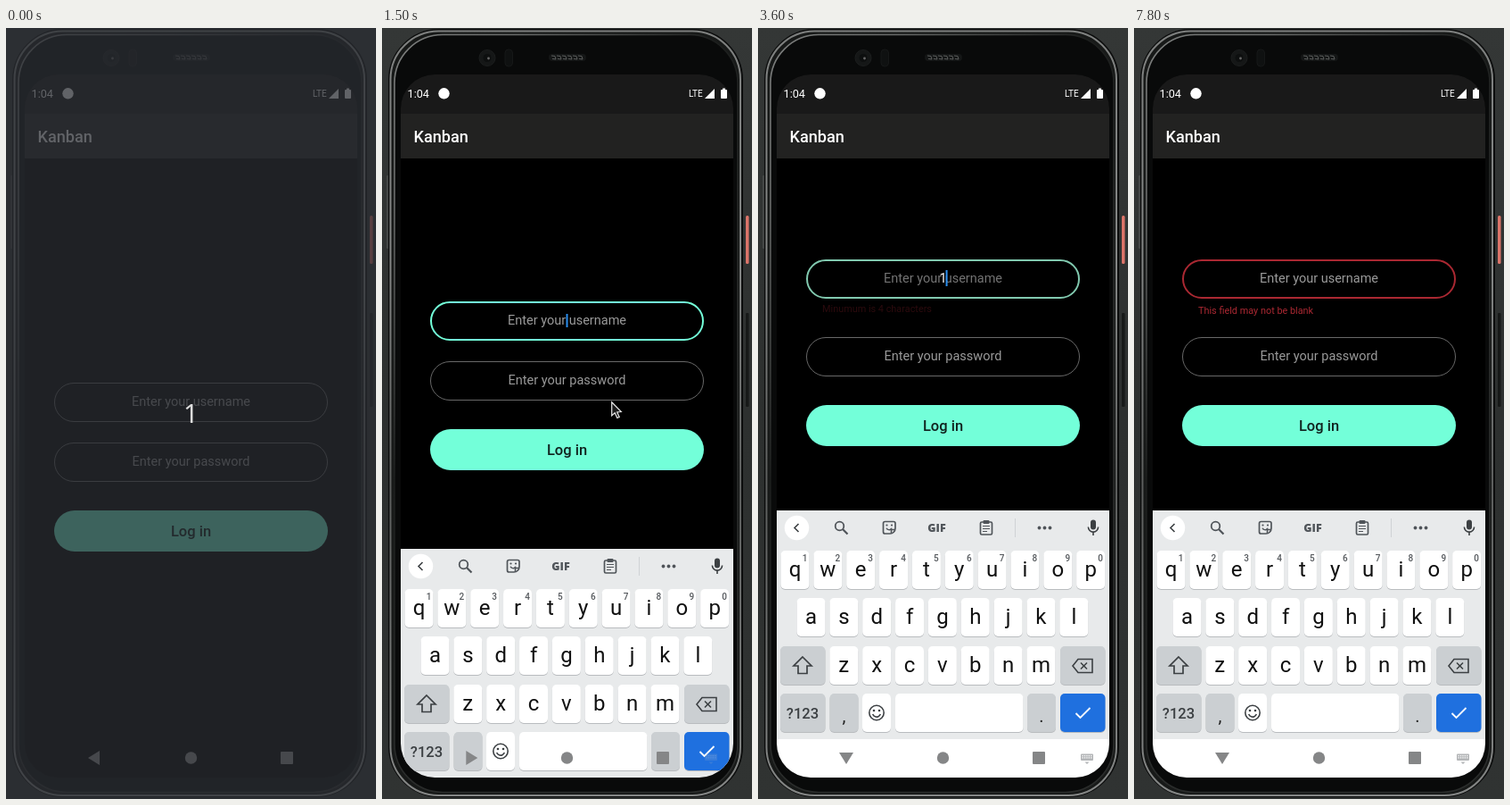
An HTML page with a canvas for the animation above (8000 ms loop, 415 by 863 pixels).

```html
<!DOCTYPE html>
<html lang="en">
<head>
<meta charset="utf-8">
<title>Kanban log in</title>
<style>
  html, body { margin: 0; width: 100%; height: 100%; overflow: hidden; background: #2d302f; }
  canvas { display: block; width: 415px; height: 863px; }
</style>
</head>
<body>
<canvas id="stage" width="415" height="863"></canvas>
<script>
const ctx = document.getElementById('stage').getContext('2d');
const LOOP = 8000;
const CENTER = 207.5;
const MINT = [115, 255, 217], RED = [170, 40, 50], GREY = [104, 104, 104];
const INK = '#3c4043', SOFT_INK = '#50555a', HINT = '#9a9a9a';

const clamp = v => Math.max(0, Math.min(1, v));
const ramp = (t, from, length) => clamp((t - from) / length);
const within = (t, spans) => spans.some(([a, b]) => t >= a && t < b);
const mix = (a, b, p) => a.map((v, i) => v + (b[i] - v) * p);
const rgb = c => `rgb(${c.map(Math.round).join(',')})`;

function paint(fill, stroke, width) {
  if (fill) { ctx.fillStyle = fill; ctx.fill(); }
  if (stroke) { ctx.strokeStyle = stroke; ctx.lineWidth = width; ctx.stroke(); }
}

function box(x, y, w, h, r, fill, stroke, width = 1) {
  ctx.beginPath();
  ctx.roundRect(x, y, w, h, r);
  paint(fill, stroke, width);
}

function disc(x, y, r, fill, stroke, width = 1) {
  box(x - r, y - r, 2 * r, 2 * r, r, fill, stroke, width);
}

function arc(x, y, r, from, to, stroke, width) {
  ctx.beginPath();
  ctx.arc(x, y, r, from, to);
  paint(null, stroke, width);
}

function poly(points, { fill, stroke, width = 1.6, open = false }) {
  ctx.beginPath();
  points.forEach(([x, y]) => ctx.lineTo(x, y));
  if (!open) ctx.closePath();
  paint(fill, stroke, width);
}

function label(str, x, y, size, color, { align = 'center', weight = 400, family = 'Roboto' } = {}) {
  ctx.font = `${weight} ${size}px "${family}", sans-serif`;
  ctx.textAlign = align;
  ctx.fillStyle = color;
  ctx.fillText(str, x, y);
  return ctx.measureText(str).width;
}

function faded(alpha, draw) {
  if (alpha <= 0) return;
  ctx.save();
  ctx.globalAlpha = alpha;
  draw();
  ctx.restore();
}

function gradient(x, y, ...stops) {
  const g = ctx.createLinearGradient(0, 0, x, y);
  stops.forEach(([at, color]) => g.addColorStop(at, color));
  return g;
}

const shell = gradient(0, 863, [0, '#343736'], [0.5, '#2d302f'], [1, '#303332']);
const rim = gradient(0, 863, [0, '#7d7f7e'], [0.3, '#858786'], [0.6, '#5c5e5d'], [1, '#858786']);
const innerRim = gradient(415, 300, [0, '#808281'], [0.25, '#6a6c6b'], [0.6, '#1c1e1d'], [1, '#2a2c2b']);

function drawPhone() {
  ctx.fillStyle = shell;
  ctx.fillRect(0, 0, 415, 863);
  box(5, 165, 3, 82, 1, '#444746');
  box(408, 319, 3.5, 105, 1, '#171918');
  box(408, 210, 3.5, 54, 1.5, '#dc7469');
  box(8, 2, 396, 858, 56, '#171918', '#0c0d0d', 2);
  box(9.5, 3.5, 392.5, 855.5, 54, null, rim, 2);
  box(14, 7.5, 385, 848, 54, '#090a0a', innerRim, 1.6);

  disc(118, 33.5, 9, '#151717', '#1c1e1e');
  disc(118, 33.5, 4.5, '#0d0f0f');
  disc(119.5, 34, 1.4, '#666');
  box(138, 24, 8.5, 19, 4, '#0f1111', '#161818');
  box(187, 29, 42, 8, 4, '#141616');
  for (let x = 190; x < 226; x += 6) {
    poly([[x, 31], [x + 4, 31.5], [x + 5, 35], [x + 1, 34.5]], { stroke: '#5a5c5b', width: 1, open: true });
  }
}

function drawBars() {
  ctx.fillStyle = '#000';
  ctx.fillRect(21, 52, 373, 787);
  ctx.fillStyle = '#191919';
  ctx.fillRect(21, 52, 373, 44);
  ctx.fillStyle = '#222221';
  ctx.fillRect(21, 96, 373, 50);
  label('1:04', 28.5, 78, 12.7, '#fff', { align: 'left' });
  disc(69.5, 73.3, 6.2, '#fff');
  label('LTE', 344, 77, 10, '#fff', { align: 'left' });
  poly([[362, 79], [373, 79], [373, 68]], { fill: '#fff' });
  box(380, 69, 7, 10, 1, '#fff');
  box(382, 67.6, 3, 2, 0, '#fff');
  label('Kanban', 35.5, 128, 18.14, '#fff', { align: 'left', weight: 500 });
}

function field(y, color, width) {
  const inset = width / 2;
  box(54 + inset, y + inset, 307 - width, 44 - width, 22 - inset, null, color, width);
}

const carets = [[1400, 1800], [2300, 2800], [3300, 4100], [4600, 5900], [6400, 7800]];

function typed(t) {
  if (t < 3600 || t >= 7300) return '';
  if (t < 5000) return '1';
  if (t < 5400) return '12';
  if (t < 6500) return '123';
  return t < 7000 ? '12' : '1';
}

function drawForm(t) {
  const lift = t < 1400 ? 0 : 128 * (1 - Math.exp((1400 - t) / 80));
  const shift = t > 1850 ? 128 : Math.round(lift);
  const spread = t >= 3600 ? 10 : 0;
  const error = ramp(t, 3550, 200);
  const focus = ramp(t, 1350, 100);
  const userY = 397 - shift - spread;
  const restY = spread - shift;
  const hintAlpha = t < 7300 ? 1 - error : ramp(t, 7250, 200);

  field(userY, rgb(mix(mix(GREY, MINT, focus), RED, error)), 1 + focus);
  faded(hintAlpha, () => label('Enter your username', CENTER, userY + 26, 14.5, HINT));
  const value = typed(t);
  const width = label(value, CENTER, userY + 26, 14.5, '#fff');
  if (within(t, carets)) {
    const height = value ? 18 : 15;
    const top = userY + (value ? 12 : 14);
    ctx.fillStyle = '#2b8ff0';
    ctx.fillRect(CENTER + width / 2 - 1, top, 2, height);
  }
  const message = t < 7300 ? 'Minumum is 4 characters' : 'This field may not be blank';
  faded(error, () => label(message, 72, userY + 61 - 3 * (1 - error), 10.88, rgb(RED), { align: 'left' }));

  field(464 + restY, rgb(GREY), 1);
  label('Enter your password', CENTER, 490 + restY, 14.5, HINT);
  box(54, 540 + restY, 307, 46, 23, rgb(MINT));
  label('Log in', CENTER, 569 + restY, 16.5, '#10231e', { weight: 500 });
}

function key(x, y, w, fill = '#fff') {
  box(x, y + 1, w, 43, 5, '#b9bcbf');
  box(x, y, w, 43, 5, fill);
}

function drawToolbar() {
  const line = { stroke: INK, open: true };
  const soft = { stroke: SOFT_INK, open: true };
  disc(43.5, 559.5, 13.7, '#fff');
  poly([[45.5, 555], [41, 559.5], [45.5, 564]], line);

  disc(91.5, 557.5, 4.8, null, SOFT_INK, 1.8);
  poly([[95, 561], [100.5, 566.5]], { ...soft, width: 2.2 });

  box(140.5, 552.5, 13.5, 13.5, [2, 2, 6, 2], null, SOFT_INK, 1.7);
  poly([[149.5, 566], [149.5, 561.5], [154, 561.5]], soft);
  disc(144.5, 556.5, 1.1, SOFT_INK);
  disc(150, 556.5, 1.1, SOFT_INK);
  arc(147, 558.5, 3.2, 0.4, Math.PI - 0.4, SOFT_INK, 1.4);

  label('GIF', 200.5, 564, 12.5, SOFT_INK, { weight: 800, family: 'Open Sans' });

  box(249.5, 553, 13, 14, 1.5, null, SOFT_INK, 1.7);
  box(252.5, 551, 7, 4, 1, SOFT_INK);
  [557.5, 560.5, 563.5].forEach((y, i) => box(252, y - 0.6, i < 2 ? 8 : 5, 1.2, 0, SOFT_INK));

  box(288, 549, 1, 21, 0, '#cfd2d5');
  [315.5, 321.5, 327.5].forEach(x => disc(x, 559.5, 1.9, SOFT_INK));

  box(373, 550.5, 6, 11, 3, INK);
  arc(376, 558.5, 5.6, 0, Math.PI, INK, 1.6);
  poly([[376, 564], [376, 568]], line);
}

function drawKeys() {
  const pitch = 36.85;
  const rows = [['qwertyuiop', 41.5, 585], ['asdfghjkl', 59.5, 638], ['zxcvbnm', 96.3, 692]];
  for (const [letters, first, y] of rows) {
    [...letters].forEach((letter, i) => {
      const x = first + i * pitch;
      key(x - 16, y, 32);
      label(letter, x, y + 29, 24, '#111');
      if (y === 585) label(String((i + 1) % 10), x + 11, 597, 10, '#55595d', { weight: 500 });
    });
  }

  const grey = '#cbcfd2';
  key(25, 692, 50.5, grey);
  poly([[50, 704], [60, 714], [55, 714], [55, 722.5], [45, 722.5], [45, 714], [40, 714]], { stroke: INK, width: 1.7 });
  key(339, 692, 50.5, grey);
  poly([[353, 714], [359, 706.5], [375, 706.5], [375, 721.5], [359, 721.5]], { stroke: INK });
  poly([[362, 710.5], [369, 717.5]], { stroke: INK, open: true });
  poly([[369, 710.5], [362, 717.5]], { stroke: INK, open: true });

  key(25, 745, 50.5, grey);
  label('?123', 50, 773, 16.6, INK, { weight: 500 });
  key(80.5, 745, 32, grey);
  label(',', 96.5, 777, 20, '#222');
  key(117, 745, 32);
  disc(133, 766.5, 8.2, null, INK, 1.6);
  disc(130, 764, 1.3, INK);
  disc(136, 764, 1.3, INK);
  arc(133, 766.5, 4.6, 0.35, Math.PI - 0.35, INK, 1.6);
  key(154, 745, 143.5);
  key(302, 745, 32, grey);
  label('.', 318, 777, 20, '#222');
  key(339, 745, 50.5, '#1f70df');
  poly([[356.5, 767], [361.5, 772], [372.5, 761]], { stroke: '#fff', width: 1.8, open: true });
}

function drawKeyboard(t) {
  if (t < 1400) return;
  const offset = t > 1850 ? 0 : Math.round(299 * Math.exp((1400 - t) / 51.6));
  ctx.save();
  ctx.translate(0, offset);
  ctx.fillStyle = '#e8eaeb';
  ctx.fillRect(21, 540, 373, 257);
  ctx.fillStyle = '#fff';
  ctx.fillRect(21, 796, 373, 43);
  drawToolbar();
  drawKeys();
  ctx.restore();
}

function drawNav(t) {
  const turn = ramp(t, 1400, 150);
  const color = t < 1500 ? '#999' : '#858687';
  ctx.save();
  ctx.translate(99 + 1.5 * Math.sin(turn * Math.PI), 817);
  ctx.rotate(Math.PI * (1 + 1.5 * turn));
  poly([[7, 0], [-6, -8], [-6, 8]], { fill: color });
  ctx.restore();
  disc(CENTER, 817, 6.7, color);
  box(308, 810, 14, 14, 1, color);

  faded(ramp(t, 1450, 300), () => {
    box(362, 812.5, 14, 7.5, 1, '#b4b6b8');
    for (let i = 0; i < 5; i++) {
      box(363.5 + i * 2.4, 814, 1.3, 1.3, 0, '#fff');
      box(363.5 + i * 2.4, 816.3, 1.3, 1.3, 0, '#fff');
    }
    poly([[366.5, 821.5], [371.5, 821.5], [369, 824]], { fill: '#b4b6b8' });
  });
}

function drawPointer(t) {
  if (t < 600 || t >= 2000) return;
  const p = 1 - (1 - ramp(t, 600, 200)) ** 1.6;
  ctx.save();
  ctx.translate(385 - 128 * p, 372 + 46 * p);
  poly([[0.7, 0.8], [0.7, 16], [4.2, 12.8], [6.8, 18.5], [9.2, 17.4], [6.7, 12], [11.3, 11.6]],
    { fill: '#1c1c1c', stroke: '#e8e8e8', width: 1.2 });
  ctx.restore();
}

function drawCountdown() {
  ctx.fillStyle = 'rgba(43,45,50,0.74)';
  ctx.fillRect(0, 0, 415, 863);
  label('1', CENTER, 442, 29.4, '#dcdcdc', { family: 'Noto Sans' });
}

function render(t) {
  drawPhone();
  ctx.save();
  ctx.beginPath();
  ctx.roundRect(21, 52, 373, 787, 38);
  ctx.clip();
  drawBars();
  drawForm(t);
  drawKeyboard(t);
  drawNav(t);
  ctx.restore();
  drawPointer(t);
  if (t < 300) drawCountdown();
}

const start = performance.now();
function tick() {
  const t = (performance.now() - start) % LOOP;
  render(Math.floor(t / 100) * 100);
  requestAnimationFrame(tick);
}
tick();
</script>
</body>
</html>
```
